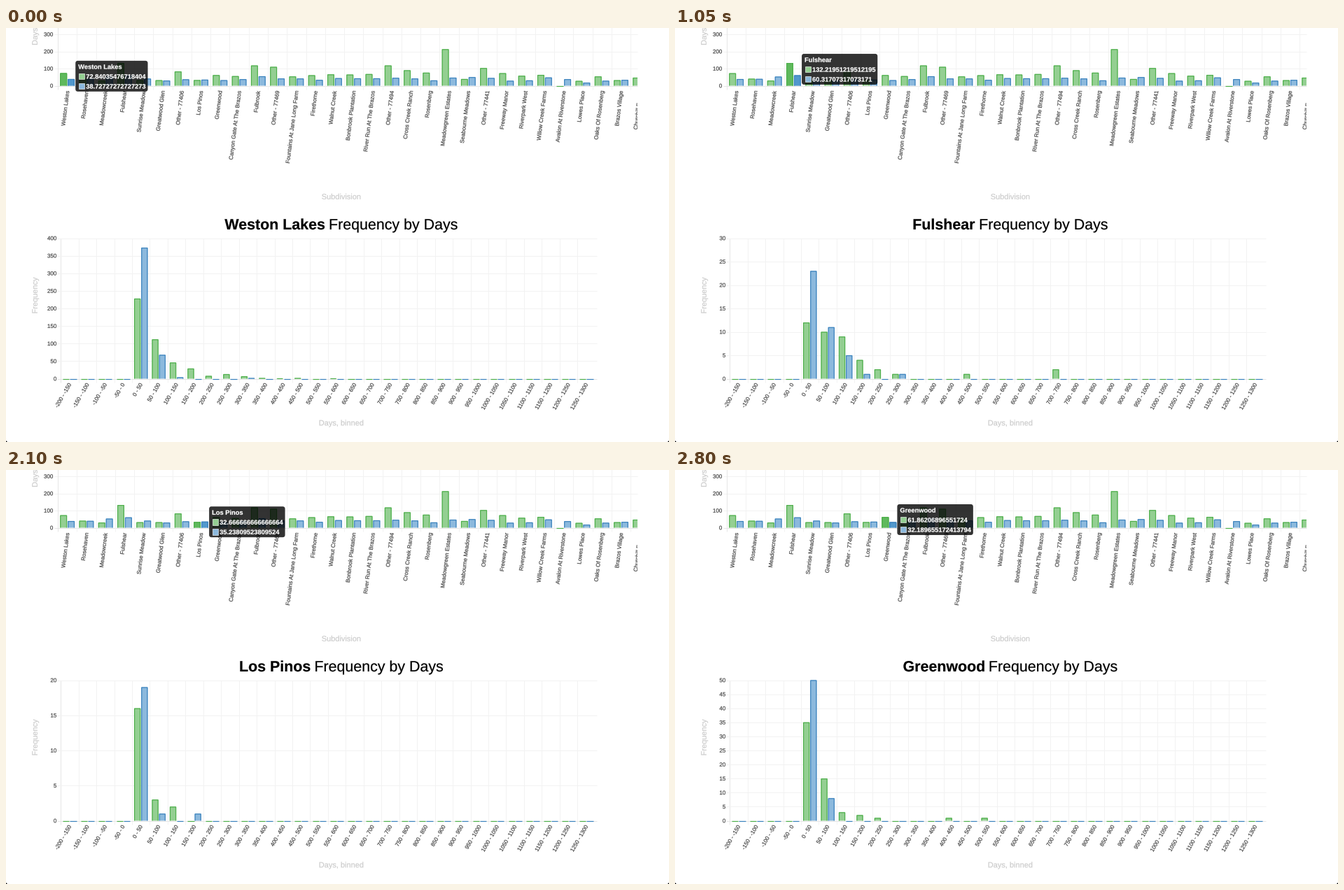
Recreate the animation shown at these times as a matplotlib script. Size 947 by 592 pixels, loop 3.15 s.

```python
import matplotlib.pyplot as plt
from matplotlib.animation import FuncAnimation
from matplotlib.patches import FancyBboxPatch, PathPatch, Polygon, Rectangle
from matplotlib.textpath import TextPath
from matplotlib.transforms import Affine2D

W, H, DPI = 947, 592, 64
PT = 72 / DPI
STEP_MS = 350

GREEN = dict(fill="#94cf92", hover="#5fb95d", edge="#4daf4a")
BLUE = dict(fill="#8cb9dd", hover="#5198cd", edge="#3a82bd")
GRID, AXIS, TICK, LABEL = "#f2f2f2", "#e6e6e6", "#444444", "#cccccc"

fig = plt.figure(figsize=(W / DPI, H / DPI), dpi=DPI, facecolor="white")
ax = fig.add_axes([0, 0, 1, 1])
ax.set_xlim(0, W)
ax.set_ylim(H, 0)
ax.axis("off")

# Upper chart: name, mean days of the two series
TOP = dict(left=74, step=27.27, base=82.5, scale=0.245, right=902)
SUBDIVISIONS = [
    ("Weston Lakes", 72.84, 38.73), ("Rosehaven", 40.78, 39.74),
    ("Meadowcreek", 30, 53), ("Fulshear", 132.2, 60.3),
    ("Sunrise Meadow", 31.9, 41.2), ("Greatwood Glen", 32, 30),
    ("Other - 77406", 83, 37), ("Los Pinos", 32.7, 35.2),
    ("Greenwood", 61.9, 32.2), ("Canyon Gate At The Brazos", 56, 38),
    ("Fulbrook", 118, 55), ("Other - 77469", 110, 42),
    ("Fountains At Jane Long Farm", 54, 42), ("Firethorne", 61, 34),
    ("Walnut Creek", 66, 44), ("Bonbrook Plantation", 65, 43),
    ("River Run At The Brazos", 68, 43), ("Other - 77494", 118, 46),
    ("Cross Creek Ranch", 90, 42), ("Rosenberg", 76, 31),
    ("Meadowgreen Estates", 213, 47), ("Seabourne Meadows", 39, 50),
    ("Other - 77441", 103, 45), ("Freeway Manor", 73, 29),
    ("Riverpark West", 58, 31), ("Willow Creek Farms", 63, 48),
    ("Avalon At Riverstone", -1, 38), ("Lowes Place", 28, 18),
    ("Oaks Of Rosenberg", 54, 29), ("Brazos Village", 32, 34),
    ("Churchill Farms", 47, 40),
]

# Lower chart: counts start at the "0 - 50" bin, the rest are zero
LOW = dict(left=78.2, step=25.45, base=501.5, top=300.5, right=844)
BINS, FIRST = 30, 4
VIEWS = [
    dict(pick=0, tips=("72.84035476718404", "38.72727272727273"),
         peak=400, tick=50,
         green=[228, 112, 46, 29, 8, 13, 7, 2, 1, 2, 0, 1],
         blue=[373, 68, 4, 0, 0, 0, 2]),
    dict(pick=1, tips=("40.78", "39.74"), peak=40, tick=5,
         green=[33, 12, 4, 0, 1], blue=[33, 13, 2, 1]),
    dict(pick=3, tips=("132.21951219512195", "60.31707317073171"),
         peak=30, tick=5,
         green=[12, 10, 9, 4, 2, 1, 0, 0, 0, 1, 0, 0, 0, 0, 2],
         blue=[23, 11, 5, 1, 0, 1]),
    dict(pick=4, tips=("31.874692874692876", "41.171990171990174"),
         peak=400, tick=50,
         green=[326, 53, 13, 7, 4, 1, 1, 0, 0, 0, 1],
         blue=[287, 103, 10, 1, 1]),
    dict(pick=5, tips=("32.142857142857146", "30.428571428571427"),
         peak=50, tick=5, green=[41, 7, 2, 1], blue=[43, 8, 1]),
    dict(pick=7, tips=("32.666666666666664", "35.23809523809524"),
         peak=20, tick=5, green=[16, 3, 2], blue=[19, 1, 0, 1]),
    dict(pick=6, tips=("83.05882352941177", "37.11764705882353"),
         peak=20, tick=5, green=[9, 4, 2, 1, 0, 1], blue=[14, 2, 1]),
    dict(pick=8, tips=("61.86206896551724", "32.189655172413794"),
         peak=50, tick=5,
         green=[35, 15, 3, 2, 1, 0, 0, 0, 1, 0, 1], blue=[50, 8]),
]
ORDER = [0, 1, 1, 2, 3, 4, 5, 6, 7]

clip = Rectangle((0, 0), TOP["right"], H, transform=ax.transData)


def line(xs, ys, color, width=1.0, z=1, snap=None):
    return ax.plot(xs, ys, color=color, lw=width * PT, zorder=z, snap=snap,
                   solid_capstyle="butt", solid_joinstyle="miter")[0]


def outline(s, size, weight="normal"):
    return TextPath((0, 0), s, size=size,
                    prop=dict(family="Liberation Sans", weight=weight))


def width(s, size, weight="normal"):
    return outline(s, size, weight).get_extents().x1


def text(x, y, s, size, color=TICK, z=3, align=0.5, rise=0.35, angle=0,
         weight="normal"):
    """Text as outlines; align is 0 left, 0.5 centre, 1 right."""
    path = outline(s, size, weight)
    place = (Affine2D()
             .translate(-align * path.get_extents().x1, -rise * size)
             .scale(1, -1).rotate_deg(-angle).translate(x, y))
    return ax.add_patch(PathPatch(place.transform_path(path), fc=color,
                                  ec=color, lw=0.2 * PT, zorder=z,
                                  snap=False))


def bar(x, y, w, base, look, hover=False):
    """A bar with an outline on every side but the bottom."""
    z = 2.5 if hover else 2
    if abs(base - y) < 0.3:
        return [line([x, x + w], [base, base], look["edge"], 1.2, z)]
    parts = []
    if y < base:
        fill = Rectangle((x, y), w, base - y, lw=0, zorder=z, snap=False,
                         fc=look["hover" if hover else "fill"])
        parts.append(ax.add_patch(fill))
    a, b = x + 0.5, x + w - 0.5
    parts.append(line([a, a, b, b], [base, y + 0.5, y + 0.5, base],
                      look["edge"], 1.2, z, snap=False))
    return parts


def pair(chart, i, y_green, y_blue, hover=False):
    slot = chart["step"] * 0.4
    x = chart["left"] + chart["step"] * (i + 0.1) + slot * 0.05
    w, base = slot * 0.9, chart["base"]
    return (bar(x, y_green, w, base, GREEN, hover)
            + bar(x + slot, y_blue, w, base, BLUE, hover))


def top_y(value):
    return TOP["base"] - value * TOP["scale"]


def draw_upper():
    for v in range(0, 301, 100):
        y = top_y(v)
        line([69, TOP["right"]], [y, y], GRID if v else AXIS)
        text(67, y, str(v), 8, align=1)
    for i, (name, g, b) in enumerate(SUBDIVISIONS):
        x = TOP["left"] + TOP["step"] * i
        line([x, x], [-2, 88], GRID if i else AXIS)
        label = text(x + TOP["step"] / 2, 90, name, 8, align=1, angle=83)
        for part in pair(TOP, i, top_y(g), top_y(b)) + [label]:
            part.set_clip_path(clip)
    text(478.5, 241, "Subdivision", 11, LABEL)
    text(41, 12.5, "Days", 11, LABEL, angle=90)


def draw_lower_frame():
    for i in range(BINS):
        x = LOW["left"] + LOW["step"] * i
        line([x, x], [LOW["top"], 506.5], GRID if i else AXIS)
        start = 50 * (i - FIRST)
        text(x + LOW["step"] / 2, 508.5, f"{start} - {start + 50}", 8,
             align=1, angle=60)
    line([73, LOW["right"]], [LOW["base"]] * 2, AXIS)
    text(478.5, 564.5, "Days, binned", 11, LABEL)
    text(41, 382.5, "Frequency", 11, LABEL, angle=90)
    for x, dx in ((0, 2), (W, -2)):
        ax.add_patch(Polygon([(x, H - 2), (x, H), (x + dx, H)],
                             fc="black", lw=0))


def histogram(view):
    parts = []
    span = (LOW["base"] - LOW["top"]) / view["peak"]
    for v in range(0, view["peak"] + 1, view["tick"]):
        y = LOW["base"] - v * span
        if v:
            parts.append(line([73, LOW["right"]], [y, y], GRID))
        parts.append(text(72, y, str(v), 8, align=1))
    for i in range(BINS):
        k = i - FIRST
        ys = [LOW["base"] - span * (c[k] if 0 <= k < len(c) else 0)
              for c in (view["green"], view["blue"])]
        parts += pair(LOW, i, *ys)
    return parts


def heading(name):
    y, size, gap, rest = 288, 21.4, 6, "Frequency by Days"
    w = width(name, size, "bold")
    x = 478.5 - (w + gap + width(rest, size)) / 2
    return [text(x, y, name, size, "black", align=0, rise=0, weight="bold"),
            text(x + w + gap, y, rest, size, "black", align=0, rise=0)]


def tooltip(view):
    name, g, b = SUBDIVISIONS[view["pick"]]
    size, r = 9.3, 3.5
    x = TOP["left"] + TOP["step"] * (view["pick"] + 0.5) + 11.6
    y = (top_y(g) + top_y(b)) / 2 - 22

    def tip(dx, dy, s):
        return text(x + dx, y + dy, s, size, "white", 12, align=0,
                    weight="bold")

    parts = [tip(4, 8.5, name)]
    parts += [tip(15, 22.5 + 14 * k, s) for k, s in enumerate(view["tips"])]
    w = max(width(name, size, "bold") + 8,
            *(width(s, size, "bold") + 18 for s in view["tips"]))
    box = FancyBboxPatch((x + r, y + r), w - 2 * r, 44 - 2 * r,
                         boxstyle=f"round,pad={r}", fc="black", lw=0,
                         alpha=0.8, zorder=10)
    parts.append(ax.add_patch(box))
    for k, look in enumerate((GREEN, BLUE)):
        swatch = Rectangle((x + 4.5, y + 18 + 14 * k), 8.5, 8.5,
                           fc=look["fill"], ec="white", lw=0.6 * PT,
                           zorder=11)
        parts.append(ax.add_patch(swatch))
    return parts


def build(view):
    name, g, b = SUBDIVISIONS[view["pick"]]
    return (histogram(view) + heading(name) + tooltip(view)
            + pair(TOP, view["pick"], top_y(g), top_y(b), hover=True))


def update(frame):
    for k, group in enumerate(groups):
        for part in group:
            part.set_visible(k == ORDER[frame])
    return []


draw_upper()
draw_lower_frame()
groups = [build(view) for view in VIEWS]
ax.set_xlim(0, W)
ax.set_ylim(H, 0)

anim = FuncAnimation(fig, update, frames=len(ORDER), interval=STEP_MS,
                     repeat=True, repeat_delay=0, blit=False)
plt.show()
```
